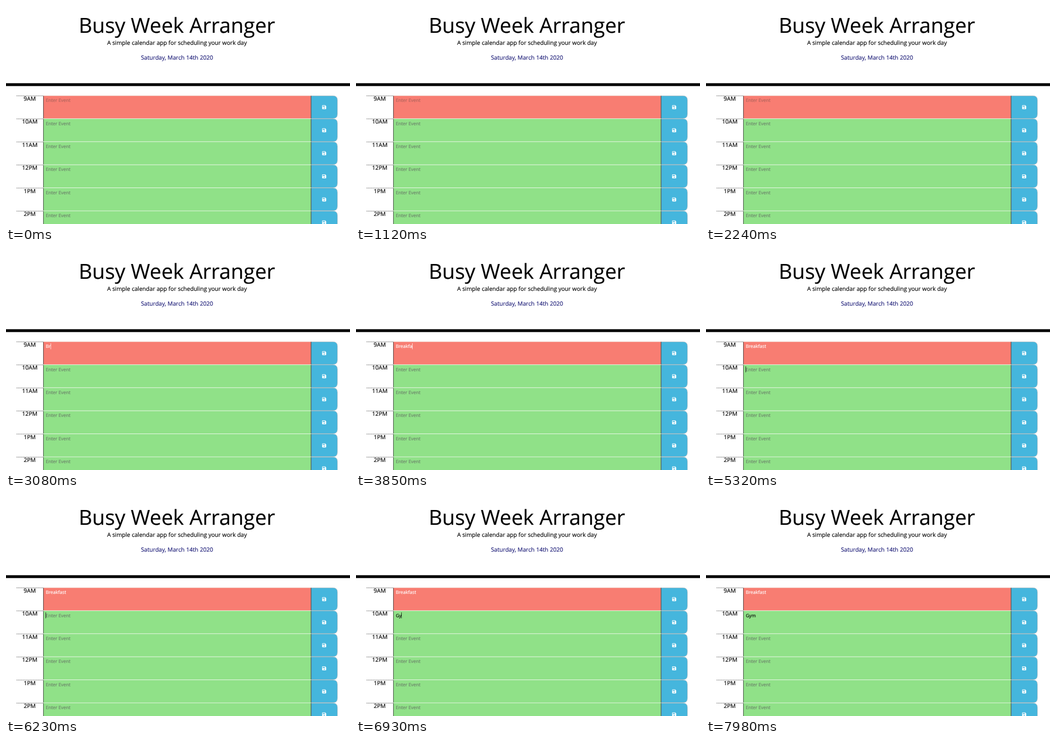
Animation of 601 by 382 pixels, one loop 8000 ms. Source, as an HTML page:

```html
<!DOCTYPE html>
<html lang="en">
<head>
<meta charset="utf-8">
<title>Day planner</title>
<style>
  html, body { margin: 0; width: 100%; height: 100%; overflow: hidden; background: #fff; }
  svg { display: block; width: 100vw; height: 100vh; }
  text {
    font-family: "Open Sans", "Noto Sans", sans-serif; font-size: 10.13px;
    fill: currentColor; stroke: currentColor; stroke-width: .15;
    text-rendering: geometricPrecision;
  }
  .mid { text-anchor: middle; }
  .title { font-size: 36.4px; }
  .date { color: #1d1d78; }
  .entry { font-size: 8.12px; }
  .side { stroke: #333; stroke-width: .8; }
  .gap { stroke: #f2f8f0; stroke-width: .8; }
  .dash { stroke: #444; stroke-width: .8; stroke-dasharray: 1.6 1; }
  .save { fill: #45b6dd; stroke: #a0acb0; stroke-width: .6; }
</style>
</head>
<body>
<svg id="stage" viewBox="0 0 601 382" preserveAspectRatio="none">
  <defs>
    <path id="disk" fill="#fff" fill-rule="evenodd"
      d="M.8 0H5.2L7 1.8V6.2Q7 7 6.2 7H.8Q0 7 0 6.2V.8Q0 0 .8 0ZM1 1V2.7H4.8V1ZM3.5 3.9A1 1 0 0 0 3.5 5.9A1 1 0 0 0 3.5 3.9Z"/>
  </defs>
  <text class="mid title" x="298.6" y="47">Busy Week Arranger</text>
  <text class="mid" x="298.8" y="67.7">A simple calendar app for scheduling your work day</text>
  <text class="mid date" x="298.8" y="93.7">Saturday, March 14th 2020</text>
  <rect y="135.3" width="601" height="5"/>
</svg>
<script>
const LOOP = 8000, TOP = 157, PITCH = 40.4, TEXT_X = 69.4;
const HOURS = ["9AM", "10AM", "11AM", "12PM", "1PM", "2PM"];
const ENTRIES = [
  { word: "Breakfast", color: "#fff", hint: "#b0645c", focus: 2450, type: 2870, step: 150, blur: 4700 },
  { word: "Gym", color: "#000", hint: "#6b806a", focus: 5200, type: 6650, step: 170, blur: 7600 }
];
const stage = document.getElementById("stage");

function add(tag, attrs, content = "") {
  const node = document.createElementNS("http://www.w3.org/2000/svg", tag);
  for (const key in attrs) node.setAttribute(key, attrs[key]);
  node.textContent = content;
  return stage.appendChild(node);
}

function buildRow(hour, i) {
  const y = TOP + i * PITCH, bottom = y + PITCH;
  add("line", { class: "dash", x1: 18.5, x2: 65, y1: y + .4, y2: y + .4 });
  add("text", { class: "mid", x: 41.5, y: y + 9 }, hour);
  add("rect", { x: 65, y, width: 468, height: PITCH, fill: i ? "#90e188" : "#f87d72" });
  add("line", { class: "gap", x1: 65, x2: 533, y1: y, y2: y });
  add("path", { class: "save", d: `M533 ${y + .4}h38.5q7.5 0 7.5 7.5v${PITCH - 15.8}q0 7.5 -7.5 7.5h-38.5z` });
  for (const x of [65.4, 533])
    add("line", { class: "side", x1: x, x2: x, y1: y + .4, y2: bottom - .4 });
  add("use", { href: "#disk", x: 552.4, y: y + 16.8 });
  return add("text", { class: "entry", x: TEXT_X, y: y + 11.2, color: i ? "#6b806a" : "#b0645c" }, "Enter Event");
}

const fields = HOURS.map(buildRow);
const caret = add("rect", { width: .7, height: 10.4 });

function draw(t) {
  caret.setAttribute("visibility", "hidden");
  ENTRIES.forEach(({ word, color, hint, focus, type, step, blur }, i) => {
    const count = Math.max(0, Math.min(word.length, Math.floor((t - type) / step) + 1));
    const field = fields[i];
    field.textContent = count ? word.slice(0, count) : "Enter Event";
    field.setAttribute("color", count ? color : hint);

    // The caret restarts its blink on focus and on every key.
    const lastAction = count ? type + (count - 1) * step : focus;
    if (t >= focus && t < blur && (t - lastAction) % 1000 < 500) {
      caret.setAttribute("x", TEXT_X - .2 + (count ? field.getComputedTextLength() : 0));
      caret.setAttribute("y", TOP + i * PITCH + 3);
      caret.setAttribute("fill", color);
      caret.setAttribute("visibility", "visible");
    }
  });
}

const start = performance.now();
function tick() {
  draw((performance.now() - start) % LOOP);
  requestAnimationFrame(tick);
}
tick();
</script>
</body>
</html>
```
